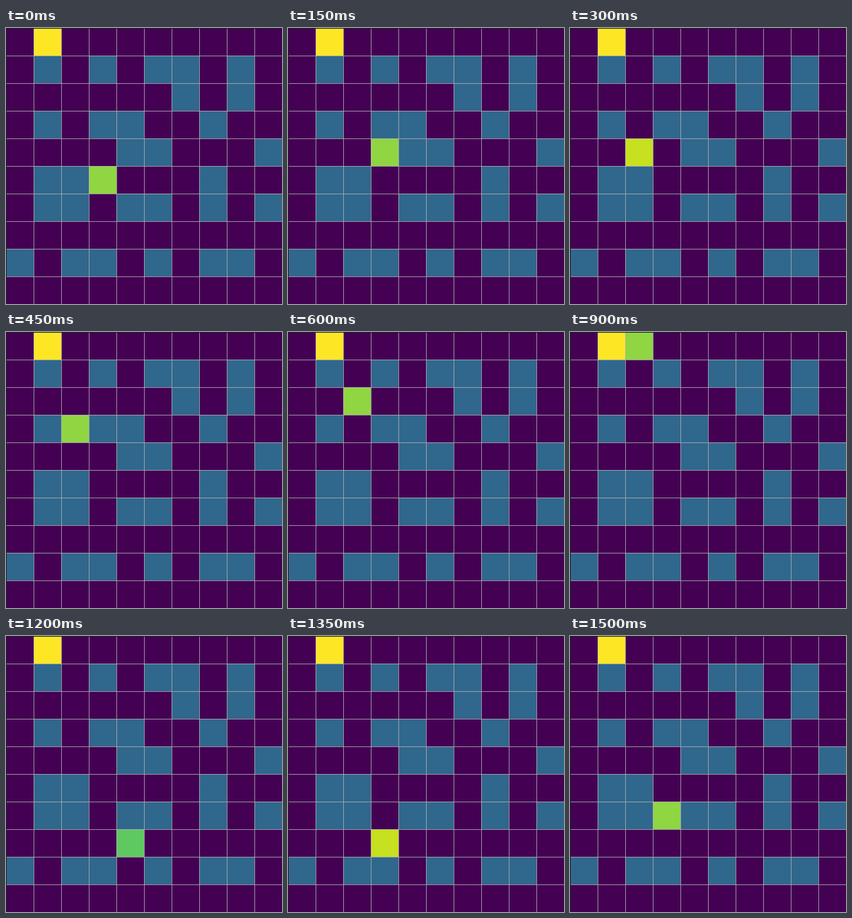
A matplotlib script that plays this animation: 400x400 px, repeating every 1.65 s.

```python
import numpy as np
import matplotlib.pyplot as plt
from matplotlib.animation import FuncAnimation

SIZE = 10
DPI = 100
LINE = 0.8 * 72 / DPI  # 0.8 px in points

# Cell values on a 0..12 viridis scale
WALL, START, UP, LEFT, GOAL = 4, 9, 10, 11, 12

WALLS = {
    1: [1, 3, 5, 6, 8],
    2: [6, 8],
    3: [1, 3, 4, 7],
    4: [4, 5, 9],
    5: [1, 2, 7],
    6: [1, 2, 4, 5, 7, 9],
    8: [0, 2, 3, 5, 7, 8],
}
GOAL_CELL = (0, 1)
START_CELL = (7, 4)
MOVES = "LUUULUUUUL"
START_OFFSET = 3  # the loop opens three steps into the walk


def walk():
    """Return (row, column, value) for the agent after each move."""
    row, col = START_CELL
    steps = [(row, col, START)]
    for move in MOVES:
        if move == "U":
            row -= 1
        else:
            col -= 1
        steps.append((row, col, UP if move == "U" else LEFT))
    return steps


def make_maze():
    maze = np.zeros((SIZE, SIZE))
    for row, cols in WALLS.items():
        maze[row, cols] = WALL
    maze[GOAL_CELL] = GOAL
    return maze


STEPS = walk()
MAZE = make_maze()

fig = plt.figure(figsize=(4, 4), dpi=DPI)
ax = fig.add_axes([0, 0, 1, 1])
image = ax.imshow(MAZE, cmap="viridis", vmin=0, vmax=GOAL,
                  interpolation="nearest")

edges = np.arange(-0.5, SIZE)
ax.set_xticks(edges)
ax.set_yticks(edges)
ax.set_xlim(-0.5, SIZE - 0.5)
ax.set_ylim(SIZE - 0.5, -0.5)
ax.grid(color="#b0b0b0", linewidth=LINE)
ax.tick_params(length=0, labelbottom=False, labelleft=False)
for spine in ax.spines.values():
    spine.set_linewidth(LINE)


def update(frame):
    row, col, value = STEPS[(frame + START_OFFSET) % len(STEPS)]
    grid = MAZE.copy()
    grid[row, col] = value
    image.set_data(grid)
    return [image]


anim = FuncAnimation(fig, update, frames=len(STEPS), interval=150,
                     repeat=True, repeat_delay=0, blit=False)
plt.show()
```
